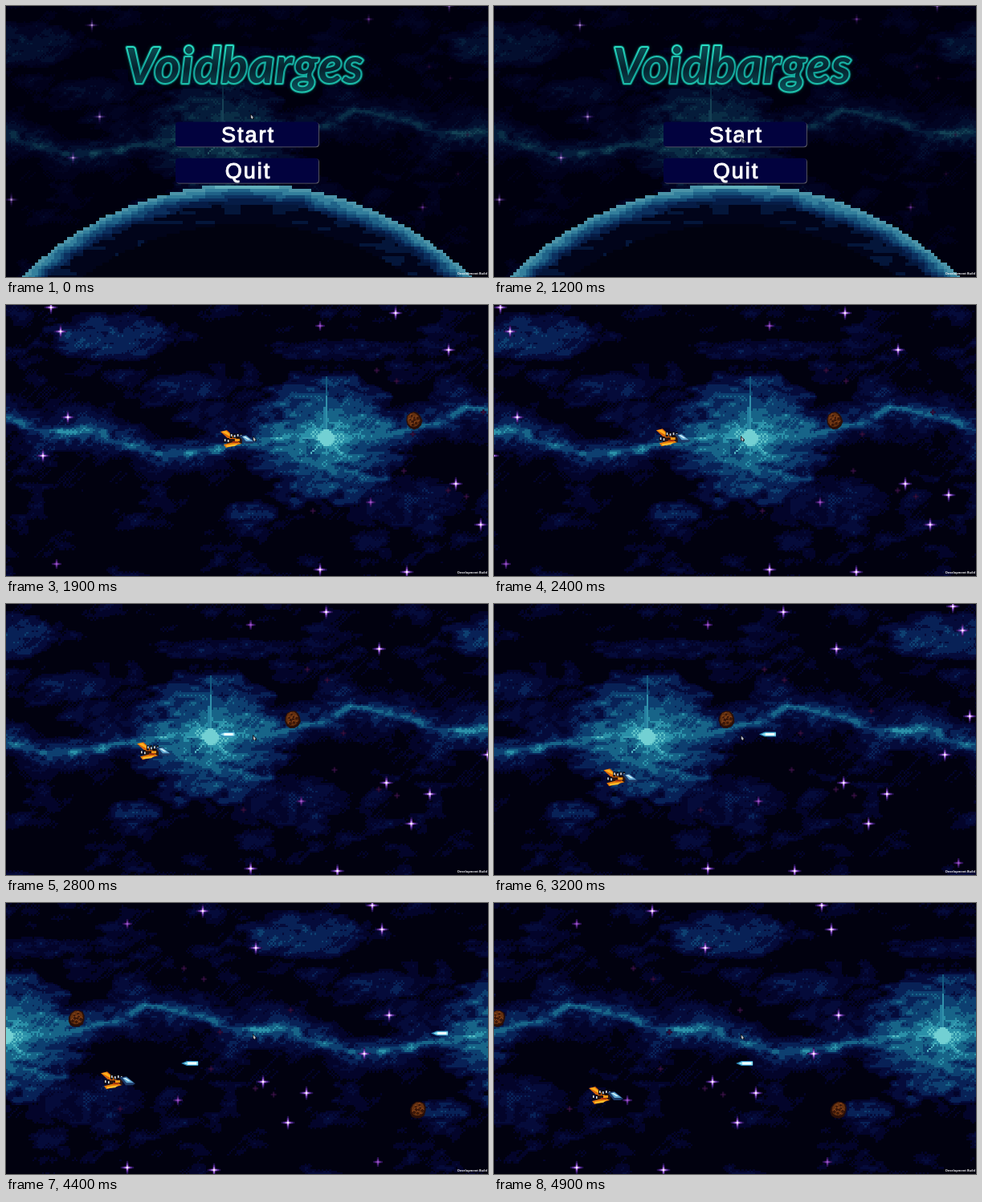
Write an HTML page with a canvas that moves like this. It is 600 px wide and 338 px high and loops after 5000 ms.

```html
<!DOCTYPE html>
<html lang="en">
<head>
<meta charset="utf-8">
<title>Space game</title>
<style>
  html, body { margin: 0; width: 100%; height: 100%; overflow: hidden; background: #01010f; }
  canvas { display: block; width: 600px; height: 338px; }
</style>
</head>
<body>
<canvas id="stage" width="600" height="338"></canvas>
<script>
const ctx = document.getElementById('stage').getContext('2d');
const LOOP = 5000, STEP = 100, GAME_AT = 1.3;
const PERIOD = 640, TW = 272, TH = 160, PX = PERIOD / TW, TOP = -19;

const mod = (a, n) => ((a % n) + n) % n;
const lerp = (a, b, k) => a + (b - a) * k;
const clamp = k => Math.max(0, Math.min(1, k));
const smooth = k => k * k * (3 - 2 * k);

function hash(x, y) {
  let h = Math.imul(x + 374, 374761393) ^ Math.imul(y + 91, 668265263);
  h = Math.imul(h ^ (h >>> 13), 1274126177);
  return ((h ^ (h >>> 16)) >>> 0) / 4294967296;
}

// Value noise that repeats every nx cells horizontally.
function noise(x, y, nx) {
  const i = Math.floor(x), j = Math.floor(y);
  const u = smooth(x - i), v = smooth(y - j);
  const a = mod(i, nx), b = mod(i + 1, nx);
  return lerp(lerp(hash(a, j), hash(b, j), u), lerp(hash(a, j + 1), hash(b, j + 1), u), v);
}

// Value at x between [x, value] keys.
function between(keys, x, ease = k => k) {
  let i = 0;
  while (i < keys.length - 2 && x > keys[i + 1][0]) i++;
  const [a, b] = [keys[i], keys[i + 1]];
  return lerp(a[1], b[1], ease(clamp((x - a[0]) / (b[0] - a[0]))));
}

function layer(w, h, paint) {
  const c = document.createElement('canvas');
  c.width = w;
  c.height = h;
  paint(c.getContext('2d'));
  return c;
}

// ---- nebula ----
const SKY = ['#01010f', '#03042a', '#050b3a', '#082156', '#0d3f70', '#176488', '#2a90a8', '#5cc0c6'];
const STREAM = [
  [0, 137], [45, 158], [105, 157], [195, 186], [302, 171], [355, 162],
  [440, 168], [508, 153], [550, 142], [572, 127], [640, 137]
];
// x, y, x radius, y radius, strength
const CLOUDS = [
  [397, 165, 98, 88, 4.6], [125, 38, 85, 30, 3.3], [225, 101, 55, 18, 2.4],
  [410, 55, 90, 14, 1.9], [302, 257, 34, 17, 2.6], [495, 245, 80, 36, 1.7], [553, 112, 28, 32, 2.2]
];
const SUN = [397, 165];

function density(x, y) {
  const px = x * PX, py = y * PX + TOP;
  const fine = noise(x / 4, y / 2, 68), mid = noise(x / 8, y / 4, 34), wide = noise(x / 16, y / 11, 17);
  const dist = py - between(STREAM, px) + (mid - 0.5) * 8;
  const knot = noise(x / 8, 70, 34);
  const stream = (0.7 + 1.9 * knot) * Math.exp(-((dist / (4 + 3 * fine)) ** 2))
    + 2.9 * Math.exp(-((dist / (13 + 24 * wide)) ** 2));
  let cloud = Math.max(0, mid * 0.5 + wide * 0.5 - 0.55) * 5;
  for (const [cx, cy, rx, ry, k] of CLOUDS) {
    const dx = mod(px - cx + 320, PERIOD) - 320, dy = py - cy;
    const r = (dx / rx) ** 2 + (dy / ry) ** 2 + (mid - 0.5) * 0.7;
    cloud = Math.max(cloud, k * Math.sqrt(clamp(1 - r)));
  }
  const core = 1.3 * Math.exp(-((px - SUN[0]) ** 2 + (py - SUN[1]) ** 2) / 600);
  let d = Math.max(stream, cloud) + 0.25 * Math.min(stream, cloud) + core;
  d += (fine - 0.5) * 1.7 * Math.min(1, d);
  // slanted hatching
  const diag = mod(x + y, TW);
  if (diag % 2 === 0 && noise(diag / 2, y / 9, 136) * 0.5 + wide * 0.5 > 0.6) d += 0.6;
  return Math.min(d, 6.4);
}

const nebula = layer(TW, TH, g => {
  for (let y = 0; y < TH; y++) {
    for (let x = 0; x < TW; x++) {
      const level = Math.floor(density(x, y) + ((x + y) & 1 ? 0.62 : 0.38));
      g.fillStyle = SKY[Math.max(0, level)];
      g.fillRect(x, y, 1, 1);
    }
  }
  // the sun with its rays
  const sx = Math.round(SUN[0] / PX), sy = Math.round((SUN[1] - TOP) / PX);
  const dot = (x, y, c, w = 1, h = 1) => { g.fillStyle = c; g.fillRect(sx + x, sy + y, w, h); };
  dot(0, -32, '#155b80', 1, 12);
  dot(-1, -16, '#2580a0', 1, 14);
  dot(0, -22, '#3191aa', 1, 31);
  dot(-12, 0, '#3b9fb4', 24, 1);
  for (let i = 4; i < 9; i++) {
    for (const s of [-1, 1]) {
      dot(s * i, -i, '#3b9fb4');
      dot(s * i, i, '#4db2bf');
    }
  }
  for (let y = -4; y <= 4; y++) {
    for (let x = -4; x <= 4; x++) if (x * x + y * y < 18) dot(x, y, '#72d0d3');
  }
});

// ---- stars ----
const BRIGHT = [
  [56, 3], [68, 33], [77, 140], [46, 188], [485, 10], [551, 56], [560, 223],
  [591, 274], [391, 330], [499, 333], [614, 237]
];
const MEDIUM = [[63, 323], [391, 26], [454, 246]];
const DIM = Array.from({ length: 8 }, (_, i) => [350 + 280 * hash(i, 5), 70 + 190 * hash(i, 6)]);
const STARS = [
  [DIM, ['#220a30', '#34103f']],
  [MEDIUM, ['#2c1155', '#5c2888', '#9a55c4']],
  [BRIGHT, ['#24124f', '#562c92', '#a56cd8', '#fff0ff']]
];

function star(x, y, ink) {
  ink.forEach((c, i) => {
    const size = (2 * (ink.length - i) - 1) * PX;
    box(c, x - size / 2, y - PX / 2, size, PX);
    box(c, x - PX / 2, y - size / 2, PX, size);
  });
}

function drawNebula(shift) {
  ctx.imageSmoothingEnabled = false;
  for (let x = mod(shift, PERIOD) - PERIOD; x < PERIOD; x += PERIOD) {
    ctx.drawImage(nebula, x, TOP, PERIOD, TH * PX);
  }
}

function drawStars(shift) {
  for (const [spots, ink] of STARS) {
    for (const [x, y] of spots) star(mod(x + shift + 20, PERIOD) - 20, y, ink);
  }
}

// ---- planet of the menu ----
const RIM = ['#4b93a8', '#337f9c', '#1f6288', '#134a74', '#0b2f5e', '#061c46'];
const planet = layer(150, 85, g => {
  for (let y = 54; y < 85; y++) {
    for (let x = 0; x < 150; x++) {
      const px = x * 4 + 2, py = y * 4 + 2;
      const depth = 396 - Math.hypot(px - 299, py - 618);
      if (depth < 0) continue;
      const n = noise(x / 7, y / 1.6, 99);
      const band = Math.floor(depth / 4 + (n - 0.5) * 2 * clamp(depth / 10));
      const haze = n > 0.45 + depth / 150 ? '#04163a' : '#01041a';
      g.fillStyle = depth < 6 && Math.abs(px - 299) < 40 ? '#62aebb'
        : RIM[Math.max(0, band)] || (depth < 50 ? haze : '#01020f');
      g.fillRect(x, y, 1, 1);
    }
  }
});

// ---- sprites ----
function poly(color, ...p) {
  ctx.fillStyle = color;
  ctx.beginPath();
  for (let i = 0; i < p.length; i += 2) ctx.lineTo(p[i], p[i + 1]);
  ctx.fill();
}

function box(color, x, y, w, h) {
  ctx.fillStyle = color;
  ctx.fillRect(x, y, w, h);
}

function at(x, y, draw, turn = 0) {
  ctx.save();
  ctx.translate(x, y);
  ctx.rotate(turn);
  draw();
  ctx.restore();
}

function ship() {
  box('#2a1410', -13, -3, 19, 9);
  poly('#d9640c', -21, -9, -13, -11, -1, 0, -11, 0);
  poly('#ffae1c', -20, -9, -14, -10, -4, -2, -9, -3);
  poly('#e57a0c', -17, 7, 0, 3, 5, 6, -14, 11);
  poly('#ffc02c', -14, 8, 1, 6, -3, 9, -13, 10);
  for (let i = 0; i < 6; i++) {
    const x = -17 + i * 4, y = i < 2 ? 0 : -6;
    box('#0b0b12', x, y - 1, 3, 6);
    box('#d5dce4', x + 1, y + (i & 1), 1.6, 3);
  }
  box('#f39a18', -3, 0, 6, 3);
  box('#a8320c', -6, 3, 7, 2);
  poly('#1d3a68', 2, -4, 11, -5, 22, 4, 19, 6, 10, 6);
  poly('#5fa6d0', 6, -3, 11, -4, 20, 3, 11, 3);
  poly('#d4f2fa', 7, -3, 10, -3, 16, 1, 13, 1);
}

function rock() {
  const blob = (color, size, dx) => {
    const ring = [];
    for (let i = 0; i < 12; i++) {
      const a = i * Math.PI / 6, r = size * (0.92 + 0.16 * hash(i, 3));
      ring.push(dx + r * 0.88 * Math.cos(a), dx + r * Math.sin(a));
    }
    poly(color, ...ring);
  };
  blob('#2a0f08', 11.3, 0);
  blob('#64300f', 9, -0.8);
  for (let i = 0; i < 9; i++) {
    const a = i * 2.4, r = 2.4 * Math.sqrt(i), s = 2 + 2 * hash(i, 8);
    const x = r * Math.cos(a) - s / 2, y = r * Math.sin(a) - s / 2;
    box('#8a461c', x - 1, y - 1, s, s);
    box('#3a1709', x, y, s, s);
  }
}

function bullet() {
  poly('#2a86b8', -11, 0, -4, -3, 10, -3, 10, 3, -4, 3);
  poly('#8fe0ee', -8, 0, -3, -2, 10, -2, 10, 2, -3, 2);
  box('#f2ffff', -3, -1.5, 11, 3);
}

function cursor() {
  poly('#05050c', -2, -4, 3, 1, 2, 3.5, -2, 2);
  poly('#b4b8c2', -1.2, -2.4, 1.7, 0.5, 1, 3, -1.2, 1.5);
}

function text(str, x, y, font, align) {
  ctx.font = font;
  ctx.textAlign = align;
  ctx.fillText(str, x, y);
}

function buildTag() {
  ctx.fillStyle = '#f4f4f4';
  text('Development Build', 599, 334.8, '700 3.9px "Open Sans", sans-serif', 'right');
}

// ---- menu ----
function title() {
  const name = 'Voidbarges', y = 96, font = 'italic 700 61px Lato, sans-serif';
  const fade = (...colors) => {
    const g = ctx.createLinearGradient(0, 52, 0, 104);
    colors.forEach((c, i) => g.addColorStop(i / (colors.length - 1), c));
    return g;
  };
  const outline = (color, width, blur) => {
    ctx.strokeStyle = color;
    ctx.lineWidth = width;
    ctx.shadowBlur = blur;
    ctx.strokeText(name, 297, y);
  };
  ctx.save();
  ctx.font = font;
  ctx.textAlign = 'center';
  ctx.letterSpacing = '1.2px';
  ctx.lineJoin = 'round';
  ctx.shadowColor = '#02201f';
  outline('#06484c', 6, 4);
  outline(fade('#27dcc0', '#12a59c', '#1fc6ae'), 4, 0);
  ctx.fillStyle = fade('#0a4a50', '#06222e', '#0a4f58');
  text(name, 297, y, font, 'center');
  ctx.restore();
}

function button(label, y) {
  const plate = (color, shift) => {
    ctx.fillStyle = color;
    ctx.beginPath();
    ctx.roundRect(211 + shift, y + shift, 178, 31, 4);
    ctx.fill();
  };
  plate('#66666c', 0.8);
  plate('#02023e', 0);
  ctx.save();
  ctx.letterSpacing = '2px';
  ctx.fillStyle = ctx.strokeStyle = '#fff';
  text(label, 301.5, y + 25, '27px "Liberation Sans", Arial, sans-serif', 'center');
  ctx.strokeText(label, 301.5, y + 25);
  ctx.restore();
}

// Draws a backdrop layer zoomed around the middle of the stage.
function zoomed(zoom, alpha, draw) {
  ctx.save();
  ctx.globalAlpha = alpha;
  ctx.translate(300, 169);
  ctx.scale(zoom, zoom);
  ctx.translate(-300, -169);
  draw();
  ctx.restore();
}

function menu(t) {
  zoomed(600 / PERIOD, 0.45, () => drawNebula(-131));
  zoomed(PERIOD / 600, 0.25, () => drawStars(51));
  ctx.imageSmoothingEnabled = false;
  ctx.drawImage(planet, 0, 0, 600, 340);
  title();
  button('Start', 144.5);
  button('Quit', 189.8);
  const k = smooth(clamp((t - 0.1) / 0.9));
  at(lerp(306, 310, k), lerp(138, 167, k), cursor);
}

// ---- game ----
const CLIMB = [[1.9, 167], [2.5, 165], [3.25, 217], [3.85, 174], [4.7, 240]];
const shipX = t => 139 + 161 * (1 - clamp((t - 1.82) / 2.08)) ** 2;
const shipY = t => between(CLIMB, t, smooth);

function shot(fired, x, y, t) {
  if (t > fired) at(x + 166 * (t - fired), y, bullet);
}

function game(t) {
  const dt = t - 1.9;
  drawNebula(-160 * dt);
  drawStars(-96 * dt);
  at(508 - 168 * dt, 144, rock, 0.3 * dt);
  at(933 - 168 * dt, 258, rock, 0.3 * dt);
  shot(2.55, 233, 162.5, t);
  shot(4.08, 176, 200, t);
  at(shipX(t), shipY(t), ship);
  at(309, 167, cursor);
}

function render(t) {
  box(SKY[0], 0, 0, 600, 338);
  (t < GAME_AT ? menu : game)(t);
  buildTag();
}

const start = performance.now();
function tick() {
  const ms = (performance.now() - start) % LOOP;
  render(Math.floor(ms / STEP) * STEP / 1000);
  requestAnimationFrame(tick);
}
tick();
</script>
</body>
</html>
```
